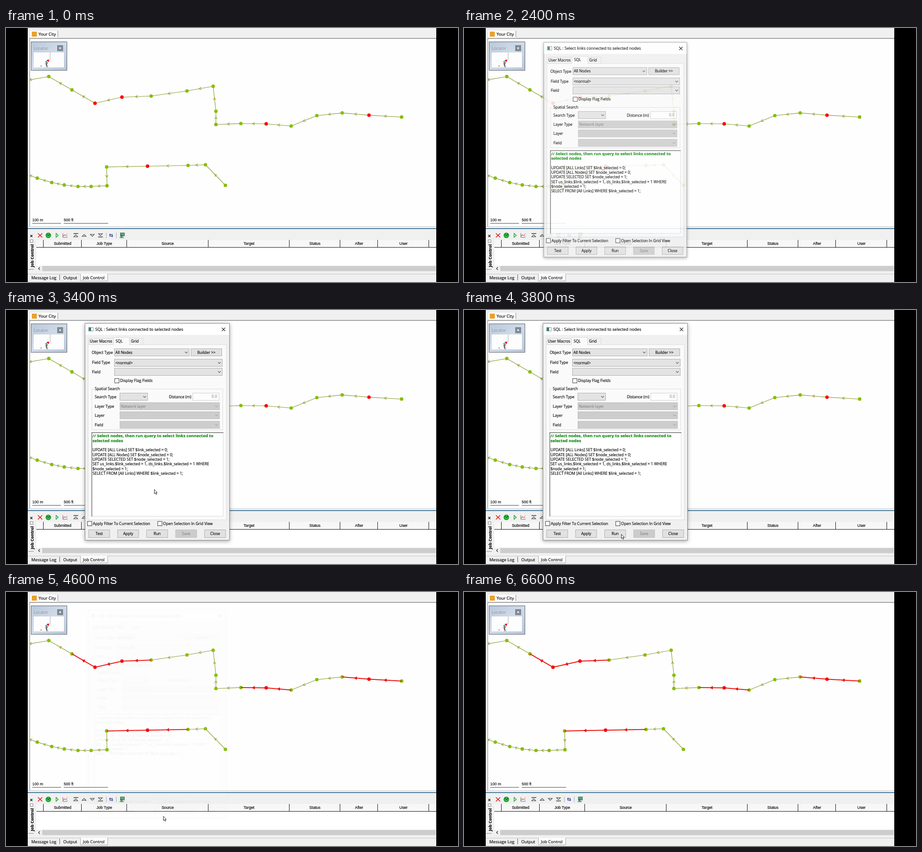
Write an HTML page that moves like this. It is 998 by 561 pixels and loops after 7200 ms.

```html
<!DOCTYPE html>
<html lang="en">
<head>
<meta charset="utf-8">
<title>Select links connected to selected nodes</title>
<style>
html, body { margin: 0; width: 100%; height: 100%; overflow: hidden; background: #000; }
svg { display: block; width: 998px; height: 561px; }
text { font: 8.5px "Open Sans", "Noto Sans", sans-serif; fill: #000; stroke: #000; stroke-width: .16px; white-space: pre; }
.ui { font-size: 9.2px; }
.head { font: 8.6px "Liberation Sans", sans-serif; }
.note { font-size: 9.1px; font-weight: 700; fill: #0a860e; stroke: #0a860e; }
.side { font-size: 9.1px; font-weight: 700; }
.off { fill: #777; stroke: none; }
.faint { fill: #8c919b; stroke: none; }
</style>
</head>
<body>
<svg id="stage" viewBox="0 0 998 561">
  <defs>
    <clipPath id="mapClip"><rect x="53" y="24" width="897" height="413"/></clipPath>
    <linearGradient id="glass" x1="0" y1="0" x2="1" y2="1">
      <stop offset="0" stop-color="#bac8da"/><stop offset=".5" stop-color="#d0dbe8"/><stop offset="1" stop-color="#b6c5d8"/>
    </linearGradient>
    <filter id="shadow" x="-10%" y="-10%" width="120%" height="120%">
      <feDropShadow dx="0" dy="2" stdDeviation="4" flood-color="#000" flood-opacity=".34"/>
    </filter>
  </defs>
</svg>
<script>
const stage = document.getElementById('stage');

function add(parent, tag, attrs) {
  const el = document.createElementNS('http://www.w3.org/2000/svg', tag);
  for (const k in attrs) el.setAttribute(k, attrs[k]);
  parent.append(el);
  return el;
}
const group = (p, attrs = {}) => add(p, 'g', attrs);
const fill = (p, x, y, x2, y2, color) =>
  add(p, 'rect', { x, y, width: x2 - x, height: y2 - y, fill: color });
const frame = (p, x, y, x2, y2, color, stroke) =>
  add(p, 'rect', { x: x + .5, y: y + .5, width: x2 - x - 1, height: y2 - y - 1, fill: color, stroke });
const path = (p, d, stroke, width = 1, color = 'none') =>
  add(p, 'path', { d, stroke, 'stroke-width': width, fill: color });
const dot = (p, x, y, r, color) => add(p, 'circle', { cx: x, cy: y, r, fill: color });
function label(p, x, y, str, cls = '', anchor = 'start') {
  const el = add(p, 'text', { x, y, class: cls, 'text-anchor': anchor });
  el.textContent = str;
  return el;
}

// ---------- main window ----------
function drawShell(g) {
  fill(g, 48, 0, 950, 561, '#f0f0f0');
  fill(g, 53, 4, 115, 22, '#fafafa');
  path(g, 'M52.5 22V4.5H114', '#dedede');
  path(g, 'M114.5 6V20', '#8c8c8c');
  fill(g, 57, 8, 68, 19, '#e9a12c');
  label(g, 72, 17, 'Your City', 'ui');

  fill(g, 52, 23, 950, 438, '#fefefe');
  path(g, 'M52 23H950', '#808488', 1.6);
  path(g, 'M52.5 23V438', '#7c8084');
  path(g, 'M48 438.5H950', '#c9cdd2');
  path(g, 'M48 443H950', '#4a7c9c', 2);
}

function drawLocator(g) {
  frame(g, 55, 30, 135, 94, 'url(#glass)', '#5b6068');
  label(g, 61, 48, 'Locator', 'ui faint');
  fill(g, 113, 38, 126, 51, '#7d8894');
  path(g, 'M117.5 42.3L121.5 46.5M121.5 42.3L117.5 46.5', '#fff', 1.2);
  fill(g, 61, 54, 128, 87, '#fdfdfd');
  path(g, 'M97.5 54V70L90 71', '#999', .8);
  path(g, 'M92 71L87 75L92 78L88 82L93 86M89 73L90 87M94 74L88 79M86 78L92 83', '#333', .9);
  dot(g, 77.5, 84, .9, '#222');
  dot(g, 93, 72, 2.2, '#e81818');
}

function drawScale(g) {
  label(g, 58, 427, '100 m', 'head');
  label(g, 127.5, 427, '500 ft', 'head');
  path(g, 'M58 431.5H121.5M127.5 431.5H225.5', '#777', 1.7);
}

function drawToolbar(g) {
  path(g, 'M70.5 453.5L80 462.5M80 453.5L70.5 462.5', '#e01515', 1.7);
  dot(g, 93.5, 458, 6, '#128a22');
  dot(g, 93.5, 458, 4.4, '#35c248');
  path(g, 'M90.5 456L93.5 458.5L97 455.5', '#064d10', 1.2);
  path(g, 'M110.5 453.5L115.5 458L110.5 462.5Z', '#1c9c2c', 1.2, '#c8f0c8');
  path(g, 'M125.5 453V462.5H136', '#777');
  path(g, 'M126 461L129 456L132 459L135.5 454', '#cf4a4a');
  path(g, 'M126 457L136 460', '#8a8ac0', .8);
  const tri = (x, y, up) =>
    path(g, `M${x - 4.5} ${y + up * 2.3}H${x + 4.5}L${x} ${y - up * 2.3}Z`, '#444', 1.1, '#ddd');
  tri(154, 459, 1);
  tri(172.5, 458, 1);
  tri(190.5, 458, -1);
  tri(208.5, 456.5, -1);
  path(g, 'M149 454H159.5M203.5 461.5H214', '#333', 1.3);
  path(g, 'M221.5 452V464M243.5 452V464', '#aaa');
  path(g, 'M229.5 461V456H234M228 457.5L229.7 455L231.5 457.5M234.5 455V460H230M232.7 458.5L234.5 461L236 458.5', '#24409a', 1.2);
  frame(g, 252, 452, 262, 460, '#4fae68', '#4c6470');
  path(g, 'M251 463H260M256 460V463', '#4c6470', 1.4);
  dot(g, 254.5, 459, 2.5, '#1f9236');
}

function drawJobs(g) {
  path(g, 'M53.7 457L58.3 461.7M58.3 457L53.7 461.7', '#111', 1.3);
  frame(g, 53, 467, 60, 474, '#f4f4f4', '#8c8c8c');
  label(g, 0, 0, 'Job Control', 'side').setAttribute('transform', 'translate(61 528) rotate(-90)');
  path(g, 'M50 533.3H62', '#3c6fb0', 1.6).setAttribute('stroke-dasharray', '1.6 1.4');

  drawToolbar(g);
  fill(g, 67, 468, 950, 484, '#f7f7f7');
  fill(g, 67, 485, 950, 525, '#fff');
  path(g, 'M67 484.5H950', '#111');
  const edges = [83, 167, 267, 447, 626, 738, 821, 934];
  const heads = ['Submitted', 'Job Type', 'Source', 'Target', 'Status', 'After', 'User'];
  edges.forEach((x, i) => {
    path(g, `M${x - .5} 468V484`, '#111');
    if (heads[i]) label(g, (x + edges[i + 1]) / 2, 479, heads[i], 'head', 'middle');
  });
  fill(g, 80, 525.5, 949, 537, '#cdcdcd');
  path(g, 'M74.8 528.2L71.8 531.2L74.8 534.2', '#333', 1.3);

  path(g, 'M48 543.5H164M225 543.5H950', '#c4c4c4');
  fill(g, 164, 543, 225, 559, '#fbfbfb');
  path(g, 'M164.5 543V558.5H224.5V543', '#a8a8a8');
  path(g, 'M118.5 545V557', '#555');
  label(g, 56, 554.7, 'Message Log', 'ui');
  label(g, 126.5, 554.7, 'Output', 'ui');
  label(g, 170, 554.7, 'Job Control', 'ui');
}

// ---------- network: points listed upstream to downstream, third value 1 = selected ----------
const upper = [[873.5, 196.7], [801.5, 192.6, 1], [742.3, 187.6], [686.3, 193.5], [629.6, 216.5],
  [574.5, 211.7, 1], [518.6, 211], [463.5, 213.2], [463.5, 183.8], [457.4, 128.7], [399.6, 139],
  [320.5, 150.3], [256, 152.7, 1], [196.5, 166.2, 1], [145.6, 136.7], [94.5, 107.2], [14, 121]];
const lower = [[484.4, 347.5], [440.4, 302], [402, 303.5], [312.5, 305.2, 1], [222.2, 306.9],
  [223, 348.4], [188, 350], [159, 350], [128.6, 346.7], [101, 341.3], [69, 331.6], [40, 321]];

function link(g, a, b, color, width, solid) {
  path(g, `M${a[0]} ${a[1]}L${b[0]} ${b[1]}`, color, width);
  const turn = Math.atan2(b[1] - a[1], b[0] - a[0]) * 180 / Math.PI;
  const mark = path(g, 'M-2.8 -2.9L2.4 0L-2.8 2.9', color, solid ? 1.5 : 1.1, solid ? color : 'none');
  mark.setAttribute('transform', `translate(${(a[0] + b[0]) / 2} ${(a[1] + b[1]) / 2}) rotate(${turn})`);
}

function drawNetwork(g) {
  const links = group(g), nodes = group(g), chosen = group(g), picks = group(g);
  for (const chain of [upper, lower]) {
    chain.forEach((p, i) => {
      const q = chain[i + 1];
      if (q) {
        link(links, p, q, '#8b9a2e', 1.15);
        if (p[2] || q[2]) link(chosen, p, q, '#ee1212', 2, true);
      }
      dot(p[2] ? picks : nodes, p[0], p[1], 3.85, p[2] ? '#fa0404' : '#86be06');
    });
  }
  return chosen;
}

// ---------- SQL dialog ----------
function combo(g, x, y, x2, y2, off, str) {
  frame(g, x, y, x2, y2, off ? '#cdcdcd' : '#e3e3e3', off ? '#c0c0c0' : '#adadad');
  const cy = (y + y2) / 2;
  path(g, `M${x2 - 10} ${cy - 1.4}L${x2 - 7} ${cy + 1.6}L${x2 - 4} ${cy - 1.4}`, off ? '#a4a4a4' : '#555', 1.1);
  if (str) label(g, x + 2.5, cy + 3.1, str, off ? 'off' : '');
}
function button(g, x, y, x2, y2, str, off) {
  const box = frame(g, x, y, x2, y2, off ? '#cccccc' : '#e1e1e1', off ? '#bfbfbf' : '#adadad');
  label(g, (x + x2) / 2, (y + y2) / 2 + 3, str, off ? 'off' : '', 'middle');
  return box;
}
function check(g, x, y, str) {
  frame(g, x, y, x + 10.5, y + 10.5, '#fff', '#333');
  label(g, x + 12.3, y + 8.4, str);
}

function drawDialog(g) {
  frame(g, 174, 29, 494, 509, '#f0f0f0', '#858585').setAttribute('filter', 'url(#shadow)');
  fill(g, 175, 30, 493, 55, '#fff');
  frame(g, 182, 38, 193, 47, '#fff', '#8a8f94');
  fill(g, 183, 39, 188, 46, '#2f8276');
  label(g, 197, 46, 'SQL : Select links connected to selected nodes').style.fontSize = '9.1px';
  path(g, 'M476.5 39.2L484 46.7M484 39.2L476.5 46.7', '#111', 1.2);

  frame(g, 181, 76, 487, 464, '#fafafa', '#dcdcdc');
  frame(g, 182, 62, 238, 77, '#f0f0f0', '#d9d9d9');
  frame(g, 272, 62, 303, 77, '#f0f0f0', '#d9d9d9');
  frame(g, 237, 60, 273, 77, '#fafafa', '#d9d9d9');
  fill(g, 238, 75, 272, 78, '#fafafa');
  label(g, 185, 72.3, 'User Macros');
  label(g, 242, 71.5, 'SQL');
  label(g, 276, 72.3, 'Grid');

  label(g, 236, 96.8, 'Object Type', '', 'end');
  combo(g, 239, 85, 405, 102, 0, 'All Nodes');
  button(g, 408, 85, 477, 102, 'Builder >>');
  label(g, 190, 119.2, 'Field Type');
  combo(g, 239, 108, 478, 125, 0, '<normal>');
  label(g, 190, 139.7, 'Field');
  combo(g, 239, 128, 478, 145, 0);
  check(g, 239.5, 151, 'Display Flag Fields');

  frame(g, 189, 174, 479, 265, 'none', '#dcdcdc');
  fill(g, 194, 170, 253, 179, '#fafafa');
  label(g, 196, 177.3, 'Spatial Search');
  label(g, 196, 195, 'Search Type');
  combo(g, 251, 183, 313, 200, 0);
  label(g, 409, 195, 'Distance (m)', '', 'end');
  frame(g, 412, 183, 471, 200, '#fdfdfd', '#cfcfcf');
  label(g, 466, 194.2, '0.0', 'off', 'end');
  label(g, 196, 215.5, 'Layer Type');
  combo(g, 251, 204, 472, 221, 1, 'Network layer');
  label(g, 196, 235.6, 'Layer');
  combo(g, 251, 224, 472, 241, 1);
  label(g, 196, 256.8, 'Field');
  combo(g, 251, 245, 472, 262, 1);

  fill(g, 189, 270, 480, 456, '#fff');
  path(g, 'M479.5 270V455.5H189', '#d8d8d8');
  path(g, 'M189.5 456V270.7H480', '#6c6c6c', 1.5);
  ['// Select nodes, then run query to select links connected to', 'selected nodes', '',
    'UPDATE [ALL Links] SET $link_selected = 0;',
    'UPDATE [ALL Nodes] SET $node_selected = 0;',
    'UPDATE SELECTED SET $node_selected = 1;',
    'SET us_links.$link_selected = 1, ds_links.$link_selected = 1 WHERE',
    '$node_selected = 1;',
    'SELECT FROM [All Links] WHERE $link_selected = 1;'
  ].forEach((s, i) => s && label(g, 191, 281.2 + i * 10.37, s, i < 2 ? 'note' : ''));

  check(g, 179.5, 466.5, 'Apply Filter To Current Selection');
  check(g, 334.5, 466.5, 'Open Selection In Grid View');
  const boxes = ['Test', 'Apply', 'Run', 'Save', 'Close'].map((s, i) =>
    button(g, 182 + i * 64, 485, 229.5 + i * 64, 503, s, s === 'Save'));
  return boxes[2];
}

// ---------- assembly ----------
const base = group(stage);
drawShell(base);
const chosen = drawNetwork(group(base, { 'clip-path': 'url(#mapClip)' }));
drawLocator(base);
drawScale(base);
drawJobs(base);
const dialog = group(stage);
const runBox = drawDialog(dialog);
const pointer = path(stage, 'M.5 .4V9.8L2.7 7.8L4.3 11.4L5.7 10.8L4.2 7.3H7Z', '#111', .9, '#fff');

// Each row: start time in ms, then the held values.
const LOOP = 7200;
const dialogSteps = [[0, 1, 0], [2400, .99, .87], [2600, 1, 1], [4600, .956, .04], [4800, 1, 0]];
const pointerSteps = [[0], [3000, 70, 206], [3200, 266, 319], [3400, 327, 396], [3600, 341, 443],
  [3800, 347, 495], [6000]];
const runSteps = [[0, '#e1e1e1', '#adadad'], [4000, '#e5f1fb', '#0078d7'], [4400, '#cce4f7', '#005499'],
  [4600, '#e1e1e1', '#adadad']];
const held = (steps, t) => steps.filter(s => s[0] <= t).pop();

function render(t) {
  const [, scale, alpha] = held(dialogSteps, t);
  dialog.setAttribute('transform', `translate(334 269) scale(${scale}) translate(-334 -269)`);
  dialog.setAttribute('opacity', alpha);
  const [, x, y] = held(pointerSteps, t);
  pointer.setAttribute('visibility', x ? 'visible' : 'hidden');
  if (x) pointer.setAttribute('transform', `translate(${x} ${y})`);
  const [, face, edge] = held(runSteps, t);
  runBox.setAttribute('fill', face);
  runBox.setAttribute('stroke', edge);
  chosen.setAttribute('visibility', t >= 4600 ? 'visible' : 'hidden');
}

const start = performance.now();
function tick() {
  render((performance.now() - start) % LOOP);
  requestAnimationFrame(tick);
}
tick();
</script>
</body>
</html>
```
